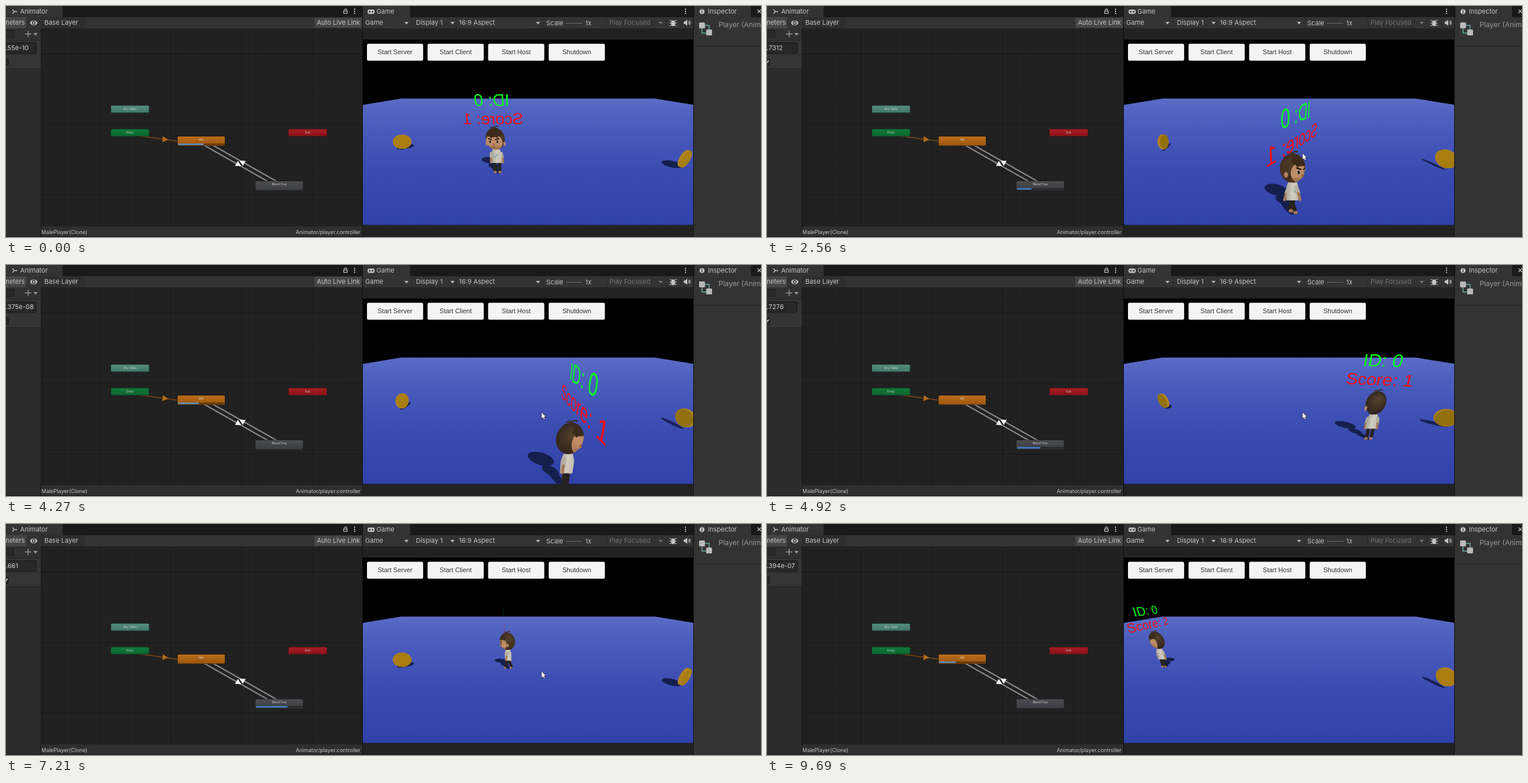
Write an HTML page with a canvas that moves like this. It is 1280 by 393 pixels and loops after 9740 ms.

```html
<!DOCTYPE html>
<html lang="en">
<head>
<meta charset="utf-8">
<title>Player animation</title>
<style>
html, body { margin: 0; width: 100%; height: 100%; overflow: hidden; background: #191919; }
canvas { display: block; width: 1280px; height: 393px; }
</style>
</head>
<body>
<canvas id="stage" width="1280" height="393"></canvas>
<script>
const LOOP = 9740, TAU = Math.PI * 2, RAD = Math.PI / 180;
const UI = 'Inter, sans-serif', SANS = '"Liberation Sans", Arial, sans-serif';
const canvas = document.getElementById('stage');
let g = canvas.getContext('2d');

// ---------- drawing helpers ----------
function box(x, y, w, h, fill, r = 0) {
  g.fillStyle = fill;
  g.beginPath();
  r ? g.roundRect(x, y, w, h, r) : g.rect(x, y, w, h);
  g.fill();
}
function poly(pts, fill) {
  g.fillStyle = fill;
  g.beginPath();
  pts.forEach(p => g.lineTo(p[0], p[1]));
  g.closePath();
  g.fill();
}
function oval(x, y, rx, ry, fill) {
  g.fillStyle = fill;
  g.beginPath();
  g.ellipse(x, y, Math.max(rx, 0), ry, 0, 0, TAU);
  g.fill();
}
function line(pts, stroke, w = 1) {
  g.strokeStyle = stroke;
  g.lineWidth = w;
  g.beginPath();
  pts.forEach(p => g.lineTo(p[0], p[1]));
  g.stroke();
}
// y is the middle of the capitals
function text(s, x, y, size = 11, fill = '#c4c4c4', align = 'left', font = UI) {
  g.font = `${size}px ${font}`;
  g.textAlign = align;
  g.fillStyle = fill;
  g.fillText(s, x, y + size * 0.36);
}
function caret(x, y, fill = '#b4b4b4') {
  poly([[x - 3.5, y - 2], [x + 3.5, y - 2], [x, y + 2.5]], fill);
}
function dots(x, y) {
  for (let i = -1; i < 2; i++) box(x - 1, y + i * 3.6 - 1, 2, 2, '#c4c4c4');
}
function arrow(x, y, angle, fill, r = 5) {
  g.save();
  g.translate(x, y);
  g.rotate(angle);
  poly([[r, 0], [-r * 0.9, -r], [-r * 0.9, r]], fill);
  g.restore();
}

// ---------- fixed interface ----------
function node(x, y, w, h, top, bottom, name, ty) {
  const grad = g.createLinearGradient(0, y, 0, y + h);
  grad.addColorStop(0, top);
  grad.addColorStop(1, bottom);
  box(x - 0.5, y - 0.5, w + 1, h + 1, '#151515', 2);
  box(x, y, w, h, grad, 1.5);
  text(name, x + w / 2, ty, 5, '#d4d4d4', 'center');
}

function drawGraph() {
  box(60, 38, 544, 337, '#212121');
  for (let i = 0; i < 46; i++) {
    const x = 63 + i * 12;
    box(x, 38, 1, 337, i % 10 == 8 ? '#181818' : '#1e1e1e');
  }
  for (let i = 0; i < 28; i++) {
    const y = 45 + i * 12;
    box(60, y, 544, 1, i % 10 == 3 ? '#181818' : '#1e1e1e');
  }
  line([[226, 221], [291, 230]], '#6b3f16', 2.2);
  arrow(270, 227, 0.1, '#b56a1c');
  line([[336, 237], [444, 298.5]], '#868686', 2.2);
  line([[351, 237], [459, 298.5]], '#868686', 2.2);
  arrow(400, 265.5, Math.PI + 0.52, '#efefef');
  arrow(394.5, 270, 0.52, '#efefef');
  node(178, 169.5, 64.5, 12, '#558f7e', '#3f7768', 'Any State', 175.5);
  node(178, 209.5, 64.5, 12, '#117a39', '#0b662e', 'Entry', 215.5);
  node(479, 209.5, 65, 12, '#a81b22', '#87141a', 'Exit', 215.5);
  node(291, 222, 80, 15.5, '#bb6c18', '#9c5710', 'Idle', 227.5);
  node(423, 298, 80.5, 15.5, '#4b4c4f', '#3d3e41', 'Blend Tree', 303.5);
}

function drawLeft() {
  box(0, 0, 604, 19, '#191919');
  box(0, 0, 96, 19, '#333');
  line([[11, 6], [14, 9.5], [19, 9.5]], '#c4c4c4', 1.3);
  line([[11, 13], [14, 9.5]], '#c4c4c4', 1.3);
  text('Animator', 24, 9.5);
  g.strokeStyle = '#c4c4c4';
  g.lineWidth = 1.2;
  g.strokeRect(572.5, 8.5, 6, 4);
  g.beginPath();
  g.arc(575.5, 7.5, 2.3, Math.PI, TAU);
  g.stroke();
  dots(591, 9);

  box(0, 19, 604, 19, '#333');
  box(0, 19, 34, 19, '#464646');
  text('meters', -4, 28.5);
  oval(47, 28.7, 6, 4, '#c4c4c4');
  oval(47, 28.7, 3.1, 3.1, '#333');
  oval(47, 28.7, 1.6, 1.6, '#c4c4c4');
  box(59, 19, 73, 19, '#2e2e2e');
  poly([[131, 19], [136, 28.5], [131, 38]], '#2e2e2e');
  text('Base Layer', 65, 28.5);
  box(523, 20, 80, 17, '#464646');
  text('Auto Live Link', 527, 28.5);

  box(0, 38, 59, 20, '#303030');
  box(-5, 41, 19, 13, '#1d1d1d', 3);
  box(-5, 42, 18, 11, '#292929', 2);
  line([[32, 47.5], [43, 47.5]], '#9c9c9c', 1.4);
  line([[37.5, 42], [37.5, 53]], '#9c9c9c', 1.4);
  caret(50, 48, '#9c9c9c');
  box(0, 58, 59, 49, '#353535');
  box(0, 58, 59, 1, '#242424');
  box(0, 82, 59, 1, '#2b2b2b');
  box(0, 107, 59, 285, '#2c2c2c');
  box(0, 106, 59, 1, '#202020');

  drawGraph();
  box(59, 38, 1, 355, '#151515');
  box(60, 375, 544, 17, '#2f2f2f');
  text('MalePlayer(Clone)', 60, 385, 9);
  text('Animator/player.controller', 601, 385, 9, '#c4c4c4', 'right');
  box(0, 392, 604, 1, '#151515');
}

function drawGameFrame() {
  box(605, 0, 560, 19, '#191919');
  box(605, 0, 80, 19, '#333');
  box(613, 6, 12, 7.5, '#c4c4c4', 3);
  oval(616.5, 9.7, 1.5, 1.5, '#333');
  oval(621.5, 9.7, 1.5, 1.5, '#333');
  text('Game', 628, 9.5);
  dots(1152, 9);
  box(605, 19, 560, 19, '#333');
  text('Game', 609, 28.5);
  text('Display 1', 695, 28.5);
  text('16:9 Aspect', 768, 28.5);
  text('Scale', 916, 29);
  text('1x', 982, 29);
  text('Play Focused', 1023, 28.5, 11, '#737373');
  [679, 757, 902].forEach(x => caret(x, 29));
  caret(1110, 29, '#737373');
  box(949, 29, 28, 1, '#6b6b6b');
  [688, 763, 911, 1018, 1119, 1143].forEach(x => box(x, 19, 1, 19, '#2a2a2a'));
  oval(1131, 29.5, 3.5, 5, '#c4c4c4');
  [-3, 0, 3].forEach(d => line([[1125, 29 + d * 1.5], [1131, 29 + d], [1137, 29 + d * 1.5]], '#c4c4c4', 1.2));
  poly([[1149, 26.5], [1151, 26.5], [1155, 23.5], [1155, 33.5], [1151, 30.5], [1149, 30.5]], '#c4c4c4');
  g.strokeStyle = '#c4c4c4';
  g.lineWidth = 1.1;
  [2.5, 4.5].forEach(r => {
    g.beginPath();
    g.arc(1155.5, 28.5, r, -0.9, 0.9);
    g.stroke();
  });
  box(605, 38, 560, 355, '#222');
}

function drawInspector() {
  box(1165, 0, 115, 19, '#191919');
  box(1167, 0, 96, 19, '#333');
  oval(1180, 9.5, 4.3, 4.3, '#c4c4c4');
  box(1179.3, 6.6, 1.5, 1.4, '#333');
  box(1179.3, 8.8, 1.5, 3.5, '#333');
  text('Inspector', 1190, 9.5);
  line([[1274, 6], [1280, 12]], '#c4c4c4', 1.2);
  line([[1274, 12], [1280, 6]], '#c4c4c4', 1.2);
  box(1166, 19, 114, 374, '#333');
  box(1166, 68, 114, 1, '#222');
  line([[1184, 33], [1192, 33], [1192, 40]], '#5fb3a8', 1.5);
  line([[1180, 37], [1180, 46], [1188, 46]], '#5fb3a8', 1.5);
  box(1175, 28, 10, 10, '#b9b9b9', 1.5);
  box(1187, 40, 10, 10, '#b9b9b9', 1.5);
  text('Player (Animator)', 1208, 31.5, 12, '#9a9a9a');
  box(604, 0, 1, 393, '#111');
  box(1165, 0, 1, 393, '#111');
}

function drawButtons() {
  ['Start Server', 'Start Client', 'Start Host', 'Shutdown'].forEach((s, i) => {
    const x = 612 + i * 102.7;
    box(x, 64.3, 95.2, 28.7, '#f4f4f4', 2.5);
    text(s, x + 47.6, 78.5, 11, '#323232', 'center', SANS);
  });
}

// ---------- world: camera one unit above the floor, pitched 20 degrees ----------
function project(x, h, d) {
  const q = 1 - h, z = 0.94 * d + 0.342 * q, f = 273.6 / z;
  return [885 + f * x, 215 - f * (0.342 * d - 0.94 * q)];
}
const shade = (x, h, d) => project(x - 0.37 * h, 0, d + 0.71 * h);

const ring = fn => Array.from({ length: 28 }, (_, i) => {
  const a = i / 28 * TAU;
  return fn(Math.cos(a), Math.sin(a));
});

const COINS = [[-1.736, 2.05], [1.733, 1.575]];
const SHADOW = '#151f4c';

function drawCoin([x, d], t) {
  const a = (24 + t * 0.1) * RAD, ca = Math.cos(a), sa = Math.sin(a), r = 0.101;
  const disc = (o, to) => ring((u, v) => to(x + r * u * ca - o * sa, 0.115 + r * v, d + r * u * sa + o * ca));
  poly(disc(0.006, shade), SHADOW);
  poly(disc(-0.006, shade), SHADOW);
  const side = d * ca - x * sa > 0 ? 1 : -1;
  for (let o = 1; o >= -1; o -= 0.2) poly(disc(o * 0.013 * side, project), '#b5831f');
  poly(disc(-0.013 * side, project), side > 0 ? '#a97d10' : '#92700f');
}

// time, x, depth, heading in degrees
const PATH = [
  [0, -.322, 1.47, 180], [1250, -.322, 1.47, 180], [1420, -.312, 1.19, 180],
  [1980, -.2, 1.13, 232], [2500, 0, .95, 232], [3000, .2, .83, 252],
  [3300, .25, .81, 278], [4420, .25, .81, 278], [4560, .4, .96, 318],
  [4920, .79, 1.342, 352], [5250, .87, 1.75, 360], [5600, .93, 1.86, 380],
  [5850, .88, 1.84, 399], [6530, .88, 1.84, 399], [6650, .68, 1.87, 450],
  [7960, -1.535, 2.184, 468], [8200, -1.71, 2.12, 468], [8600, -1.85, 2.1, 460],
  [8910, -1.745, 2.046, 443], [LOOP, -1.745, 2.046, 443]
];
const WALKS = [[1250, 3300, .7312], [4420, 5850, .7276], [6530, 8910, .661]];
// start, then a time and the decaying speed at that time
const RESTS = [[-1210, 0, 9.55e-10], [3300, 3560, .006568], [5850, 6420, 7.843e-5], [8910, 9690, 3.394e-7]];
const PICKUP = 8020;

function pose(t) {
  const i = Math.max(1, PATH.findIndex(k => k[0] > t)), a = PATH[i - 1], b = PATH[i];
  const u = (t - a[0]) / (b[0] - a[0]), mix = n => a[n] + (b[n] - a[n]) * u;
  return { x: mix(1), d: mix(2), yaw: mix(3) * RAD };
}
function motion(t) {
  const w = WALKS.find(k => t >= k[0] && t < k[1]);
  if (w) return { walk: true, bar: (t - w[0]) / 1000 % 1, speed: w[2] * (1 - Math.exp((w[0] - t) / 16)) };
  const r = RESTS.filter(k => k[0] <= t).pop();
  return { walk: false, bar: (t - r[0]) / 2200 % 1, speed: Math.min(.7, r[2] * Math.exp((r[1] - t) / 63)) };
}
function speedText(v) {
  if (v >= 1e-4) return String(+v.toPrecision(4));
  const [m, e] = v.toExponential(3).split('e-');
  return +m + 'e-' + e.padStart(2, '0');
}

// the label turns with the player and floats slightly ahead of the head
function drawLabel(s, h, p, fill) {
  const em = 0.15, e = 0.01, ahead = 0.03, c = Math.cos(p.yaw), n = Math.sin(p.yaw);
  g.font = `100px ${SANS}`;
  g.textAlign = 'center';
  g.fillStyle = fill;
  let u = -g.measureText(s).width / 200 * em;
  for (const ch of s) {
    const w = g.measureText(ch).width / 100 * em;
    u += w / 2;
    const at = (du, dh) => project(p.x + (u + du) * c - ahead * n, h + dh, p.d + (u + du) * n + ahead * c);
    const o = at(0, 0), r = at(e, 0), b = at(0, -e), k = em / 100 / e;
    g.save();
    g.transform((r[0] - o[0]) * k, (r[1] - o[1]) * k, (b[0] - o[0]) * k, (b[1] - o[1]) * k, o[0], o[1]);
    g.fillText(ch, 0, 36);
    g.restore();
    u += w / 2;
  }
}

function drawPlayerShadow(p) {
  const blob = (h, rx, rh) => poly(ring((u, v) => shade(p.x + u * rx, h + v * rh, p.d)), SHADOW);
  blob(.11, .035, .12);
  blob(.21, .055, .08);
  blob(.39, .1, .115);
}

function drawPlayer(p, m) {
  const foot = project(p.x, 0, p.d), top = project(p.x, .525, p.d);
  const k = (foot[1] - top[1]) / 100;
  const view = p.yaw + Math.atan2(p.x, p.d);
  const fx = -Math.sin(view), ft = -Math.cos(view), b = Math.atan2(fx, ft);
  const swing = m.walk ? Math.sin(m.bar * 2 * TAU) : 0;
  const skin = '#bf8c66', hair = '#3d2c1c';
  g.save();
  g.transform(k, 0, (foot[0] - top[0]) / 100, k, foot[0], foot[1]);
  g.lineCap = 'round';

  for (const s of [-1, 1]) {
    const x = s * 5 * ft, sw = swing * s;
    const toe = x * (1 - .4 * Math.abs(sw)) + sw * fx * 10, y = -2.5 + Math.min(0, sw * ft * 7);
    line([[x, -25], [toe, y - 5]], '#25221f', 7);
    oval(toe + fx * 2, y, 3.5, 2.7, '#a9774f');
  }
  const arm = s => {
    const x = s * 11 * ft, sw = -swing * s * 9 * fx;
    line([[x, -43], [x * 1.12 + sw * .5, -34]], '#b5aea2', 6);
    line([[x * 1.12 + sw * .5, -33], [x * 1.2 + sw, -23]], '#a87a55', 4.5);
  };
  const far = fx > 0 ? -1 : 1;
  arm(far);
  const shirt = g.createLinearGradient(-14, 0, 14, 0);
  shirt.addColorStop(0, '#9a948a');
  shirt.addColorStop(.5, '#d2ccc0');
  shirt.addColorStop(1, '#bdb6aa');
  const bw = 9 + 2.5 * Math.abs(ft);
  poly([[-bw * .7, -51], [bw * .7, -51], [bw, -40], [bw * .92, -22], [-bw * .92, -22], [-bw, -40]], shirt);
  if (ft > .3) {
    const x = fx * 9;
    line([[x - 5, -38], [x - 1, -34], [x + 4, -39], [x, -42]], '#6f9c9c', 1.4);
  }
  arm(-far);

  // head
  const shine = g.createRadialGradient(5, -82, 2, 0, -74, 25);
  shine.addColorStop(0, '#54402c');
  shine.addColorStop(1, ft < -.4 ? '#2e221a' : hair);
  oval(0, -74, 20.5, 23.5, shine);
  g.save();
  g.beginPath();
  g.ellipse(0, -74, 20.5, 23.5, 0, 0, TAU);
  g.clip();
  if (ft > -.85) {
    oval(fx * 16, -66, 13 + 5.5 * ft, 17, skin);
    oval(fx * 16 - 3, -54, 11 + 5 * ft, 5, 'rgba(110,65,40,.3)');
    for (const s of [-1, 1]) {
      const e = b + s * .43, c = Math.cos(e), x = 19 * Math.sin(e);
      if (c < .05) continue;
      oval(x, -67, 2.7 * c + .4, 3.2, '#e4d9cc');
      oval(x, -67, 2 * c + .3, 3, '#1e1612');
      line([[x - 4 * c, -73 + s * 1.2], [x + 4 * c, -73 - s * 1.2]], '#2c1d12', 2.4);
    }
    const mx = 18.5 * Math.sin(b);
    if (ft > 0) line([[mx - 2.5, -55], [mx + 2.5, -55]], '#7a4632', 1.4);
    oval(fx * 17, -87, 12 + 8 * Math.max(ft, 0), 10, hair);
    poly([[fx * 16 - 13, -84], [fx * 16 + 12, -84], [fx * 16 + 8, -75], [fx * 16 + 2, -80], [fx * 16 - 5, -75]], hair);
  }
  g.restore();
  if (ft > -.85) oval(18.8 * Math.sin(b), -62, 2.2, 2.8, '#a2663f');
  for (const s of [-1, 1]) {
    const e = b + s * 1.55;
    if (Math.cos(e) > -.25) oval(19.5 * Math.sin(e), -63, 2.4 + Math.cos(e), 4.6, '#b5825d');
  }
  g.strokeStyle = hair;
  g.lineWidth = 2;
  g.beginPath();
  g.moveTo(-1, -96);
  g.quadraticCurveTo(1, -102, 8, -100);
  g.moveTo(0, -96);
  g.quadraticCurveTo(-3, -101, -8, -98);
  g.stroke();
  g.restore();
}

function drawWorld(t, m) {
  g.save();
  g.beginPath();
  g.rect(605, 57, 560, 315.5);
  g.clip();
  box(605, 57, 560, 316, '#000');
  const floor = g.createLinearGradient(0, 157, 0, 373);
  floor.addColorStop(0, '#5a6cc5');
  floor.addColorStop(.2, '#4b5dbd');
  floor.addColorStop(.55, '#3b4cb2');
  floor.addColorStop(1, '#3041a9');
  poly([[605, 168.3], [670, 157.4], [1100, 157.4], [1165, 168], [1165, 373], [605, 373]], floor);

  const p = pose(t);
  drawPlayerShadow(p);
  const things = COINS.filter((c, i) => i || t < PICKUP).map(c => [c[1], () => drawCoin(c, t)]);
  things.push([p.d, () => drawPlayer(p, m)]);
  things.sort((a, b) => b[0] - a[0]).forEach(o => o[1]());
  drawLabel('ID: 0', .782, p, '#00ff1e');
  drawLabel('Score: ' + (t < PICKUP ? 1 : 2), .614, p, '#f90d12');
  drawButtons();
  g.restore();
}

function drawCursor(t) {
  if (t < 700 || t > 9420) return;
  const ease = u => { u = Math.min(1, Math.max(0, u)); return u * u * (3 - 2 * u); };
  const a = 1 - ease((t - 700) / 280), b = ease((t - 9100) / 320);
  const x = 908 - 40 * a - 63 * b, y = 251 + 142 * a + 115 * b;
  const pts = [[0, 0], [0, 10], [2.3, 8], [4, 11.5], [5.6, 10.8], [4, 7.3], [7, 7]].map(q => [x + q[0], y + q[1]]);
  line([...pts, pts[0]], '#111', 1.2);
  poly(pts, '#fff');
}

function progress(x, y, part, fill) {
  box(x, y, 78.5, 2.4, 'rgba(0,0,0,.4)');
  box(x, y, 78.5 * part, 2.4, fill);
}

function drawStatus(m) {
  if (m.walk) progress(424, 309.8, m.bar, '#3f7fd0');
  else progress(292, 234, m.bar, '#5a93c4');
  box(-5, 62, 56.5, 19, '#171717', 3);
  box(-5, 63, 55.5, 17, '#282828', 2.5);
  text(speedText(m.speed), -7, 71.5, 11, '#d2d2d2');
  box(-8, 89.5, 12.5, 12, '#171717', 2);
  box(-8, 90.5, 11.5, 10, '#282828', 1.5);
  if (m.walk) line([[-4, 95], [-1.5, 98], [3, 93]], '#dcdcdc', 1.5);
}

// the fixed interface is drawn once
const still = document.createElement('canvas');
still.width = 1280;
still.height = 393;
const screen = g;
g = still.getContext('2d');
drawLeft();
drawGameFrame();
drawInspector();
g = screen;

let start;
function frame(now) {
  start ??= now;
  const t = (now - start) % LOOP, m = motion(t);
  g.drawImage(still, 0, 0);
  drawStatus(m);
  drawWorld(t, m);
  drawCursor(t);
  requestAnimationFrame(frame);
}
requestAnimationFrame(frame);
</script>
</body>
</html>
```
